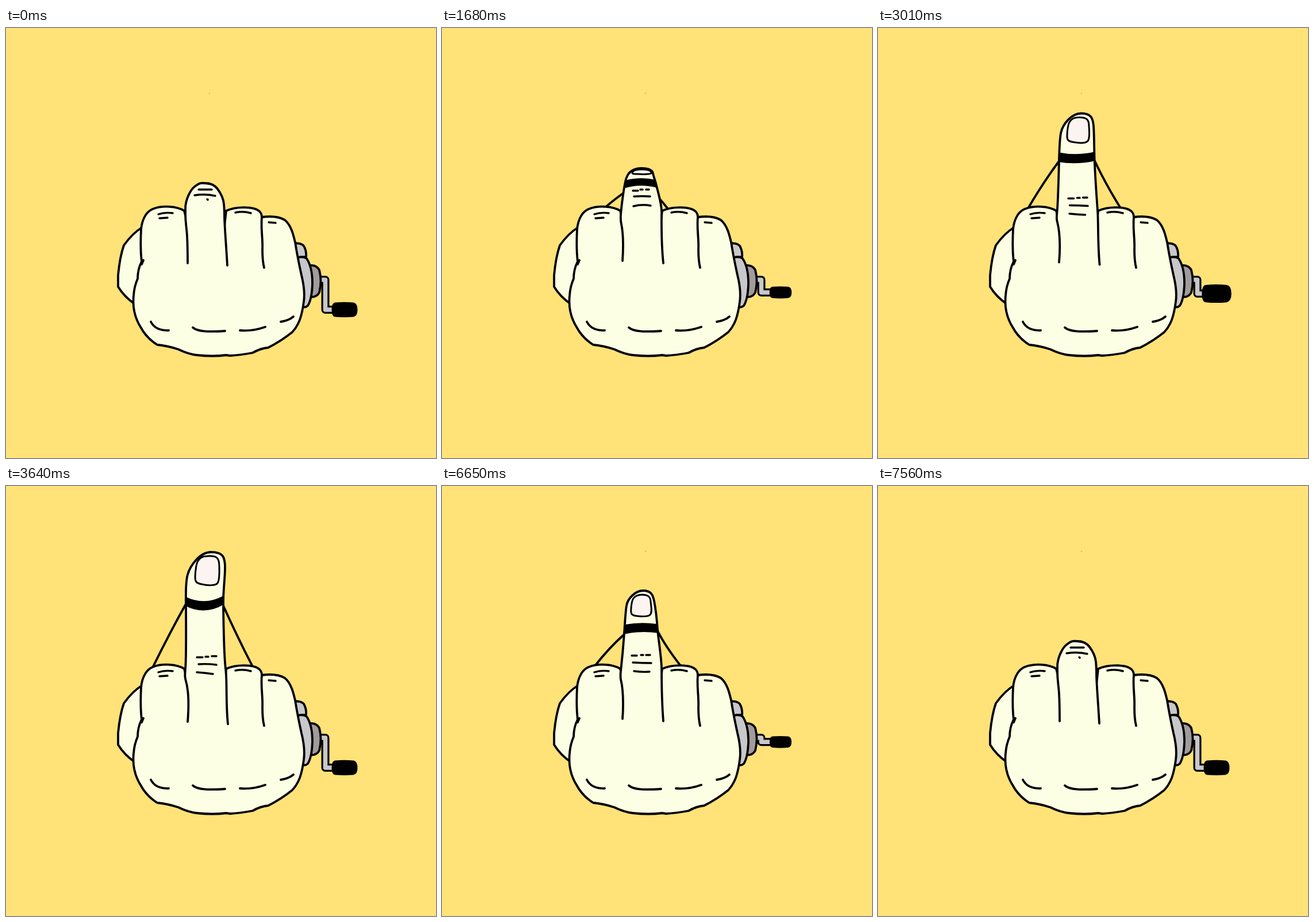
An HTML page without scripts that plays this animation: 748 px wide and 748 px high, repeating every 7.98 s.

```html
<!DOCTYPE html>
<html lang="en">
<head>
<meta charset="utf-8">
<title>Hand crank</title>
<style>
  @property --turn { syntax: "<number>"; inherits: true; initial-value: 0; }

  html, body { margin: 0; height: 100%; overflow: hidden; background: #ffe278; }
  svg { display: block; width: 100vw; height: 100vh; }

  .ink { fill: none; stroke: #000; stroke-width: 3.8; stroke-linecap: round; stroke-linejoin: round; }
  .skin { fill: #fdffe4; }
  .light { fill: #c8c8ca; }
  .dark { fill: #a19b9b; }

  /* Every pose part supplies four shapes: curled, peeking, half, raised */
  .pose { animation: pose 7980ms infinite; }
  @keyframes pose {
    0% { d: var(--curled); }
    12.28% { d: var(--curled); animation-timing-function: steps(10); }
    21.052% { d: var(--peeking); animation-timing-function: steps(12); }
    31.578% { d: var(--half); animation-timing-function: steps(14); }
    43.859% { d: var(--raised); }
    77.192% { d: var(--raised); animation-timing-function: steps(7); }
    83.333% { d: var(--half); animation-timing-function: steps(7); }
    89.473% { d: var(--peeking); animation-timing-function: steps(6); }
    94.736%, 100% { d: var(--curled); }
  }

  .finger {
    --curled: path("M316 409S316 380 315 362S312 340 312 322S312 312 313 305S320 282 328 276S338 269 347 270S362 272 368 280S378 296 379 306S380 320 380 330S382 365 385 413");
    --peeking: path("M314 405S316 375 314 355S310 340 311 325S316 282 318 272S320 262 323 256S334 244 347 244S366 247 367 253S371 265 373 274S382 305 382 320S381 372 385 409");
    --half: path("M314 405S316 378 314 355S309 340 311 322S316 270 317 256S319 220 321 208S336 182 350 182S367 190 369 200S374 236 375 250S382 300 382 318S382 372 385 409");
    --raised: path("M316 410S319 378 316 355S310 340 312 318S313 220 313 204S312 168 316 154S336 115 357 115S381 124 381 142S378 180 378 200S379 295 382 318S382 375 386 414");
  }
  .nail {
    fill: #fcf4f0; stroke-width: 3;
    --curled: path("M340 270C340 270 343 270 347 270C351 270 354 270 354 270C354 270 352 270 350 270C348 270 346 270 344 270C342 270 340 270 340 270Z");
    --peeking: path("M331 252C332 247 340 246 348 246C358 246 363 248 364 251C365 253 362 254 358 254C352 255 346 254 340 254C335 254 331 254 331 252Z");
    --half: path("M329 212C330 200 331 190 347 189C360 189 363 194 363 202C364 210 366 220 362 224C358 228 346 227 338 226C329 225 328 222 329 212Z");
    --raised: path("M329 158C330 136 332 122 350 122C366 121 371 124 371 140C371 148 372 163 368 169C364 174 350 173 341 171C331 169 329 167 329 158Z");
  }
  .band {
    --curled: path("M319 284Q346 256 373 284L373 284Q346 256 319 284Z");
    --peeking: path("M319 265Q345 258 371 264L374 278Q345 270 316 279Z");
    --half: path("M318 241Q346 236 374 240L377 256Q346 251 315 258Z");
    --raised: path("M311 192Q345 209 378 191L379 206Q345 226 311 208Z");
  }
  .strings {
    --curled: path("M330 300Q330 315 330 330M365 300Q365 315 365 330");
    --peeking: path("M320 284Q300 298 284 312M374 292Q385 304 394 316");
    --half: path("M317 258Q290 282 266 313M375 252Q388 278 416 314");
    --raised: path("M313 205Q285 255 255 316M377 206Q402 262 430 316");
  }
  .creases {
    stroke-width: 3.4;
    --curled: path("M335 281H343M343 281H350M350 281H358M328 291Q346 288 364 292M350 298Q351 298 351 299");
    --peeking: path("M332 283H341M345 281H349M355 281H360M334 293Q348 292 362 293M333 310Q348 306 363 309");
    --half: path("M330 295H339M346 294H350M355 294H362M332 307Q348 308 364 308M334 322Q348 324 361 323");
    --raised: path("M332 298H342M347 297H352M358 296H366M335 310Q350 309 366 311M332 324Q346 325 360 327");
  }

  /* The crank spins around a horizontal axle, swinging towards the viewer first */
  .crank {
    --swing: cos(var(--turn) * 1turn);
    --near: sin(var(--turn) * 1turn);
    animation: turn 7980ms infinite;
  }
  @keyframes turn {
    0% { --turn: 0; }
    12.28% { --turn: 0; animation-timing-function: steps(10); }
    21.052% { --turn: .796; animation-timing-function: steps(12); }
    31.578% { --turn: 1.57; animation-timing-function: steps(16); }
    45.614% { --turn: 3; }
    76.315% { --turn: 3; animation-timing-function: steps(14); }
    88.596% { --turn: 4.295; animation-timing-function: steps(7); }
    94.736%, 100% { --turn: 5; }
  }
  .arm { transform: translateY(438px) scaleY(calc(10 + 42 * var(--swing))); }
  .arm path { fill: none; stroke: #000; stroke-width: 14; stroke-linejoin: round; vector-effect: non-scaling-stroke; }
  .arm path + path { stroke: #c8c8ca; stroke-width: 7.5; }
  .grip {
    transform: translate(588.5px, calc(448px + 42px * var(--swing)))
      scale(calc(1 + .15 * var(--near)), calc(1 + .22 * var(--near)));
  }
</style>
</head>
<body>
<svg viewBox="0 0 748 748">
  <rect width="748" height="748" fill="#ffe278"/>
  <path d="M353 114L355 113" stroke="#b9a550" stroke-width="1.2"/>

  <g class="crank">
    <g class="arm">
      <path d="M542 0H555.5V1H574"/>
      <path d="M542 0H555.5V1H574"/>
    </g>
    <path class="grip" d="M-16 -12.5Q0 -14 16 -12.5Q23 -11 23 0Q23 11 16 12.5Q0 14 -16 12.5Q-22 12 -22 0Q-22 -12 -16 -12.5Z"/>
  </g>

  <g class="ink">
    <path class="dark" d="M529 413Q540 412 545 421Q550 440 545 460Q541 468 531 468Z"/>
    <path class="light" d="M500 375Q512 373 518 379Q523 388 522 398L506 400Z"/>
    <path class="light" d="M505 400Q516 396 523 401Q533 416 533 445Q532 472 525 483Q521 487 515 485Z"/>
    <path class="skin" d="M238 346Q220 357 205 378Q198 398 195 430V450Q205 467 225 481H250V346Z"/>
    <path class="pose strings"/>
    <path class="skin" d="M236 406C234 390 234 370 235 350C237 331 245 319 255 315C272 308 298 310 310 318L317 345H380L383 318C400 310 432 310 441 319Q445 323 445 329C460 327 475 328 485 334C496 343 500 360 503 373C506 392 510 412 514 430C519 450 520 462 518 476C515 498 511 515 498 529Q478 545 456 556Q443 557 429 565Q408 569 390 570L383 569Q360 572 332 569Q316 567 300 559Q282 553 263 551Q244 539 234 520C224 504 220 484 222 465Q223 450 229 436Q229 420 236 406Z"/>
    <path d="M239 404L236 411M445 329C443 350 447 365 446 385Q446 405 449 417"/>
    <path stroke-width="3.4" d="M265 324Q276 320 290 322M267 331L281 330M399 321Q412 318 426 322M457 338L469 339"/>
    <path d="M252 511Q260 527 283 526M325 521C333 528 350 529 381 527M407 526Q428 528 451 520M478 511Q492 509 500 502"/>
    <path class="pose finger skin"/>
    <path class="pose nail"/>
    <path class="pose creases"/>
  </g>
  <path class="pose band"/>
</svg>
</body>
</html>
```
